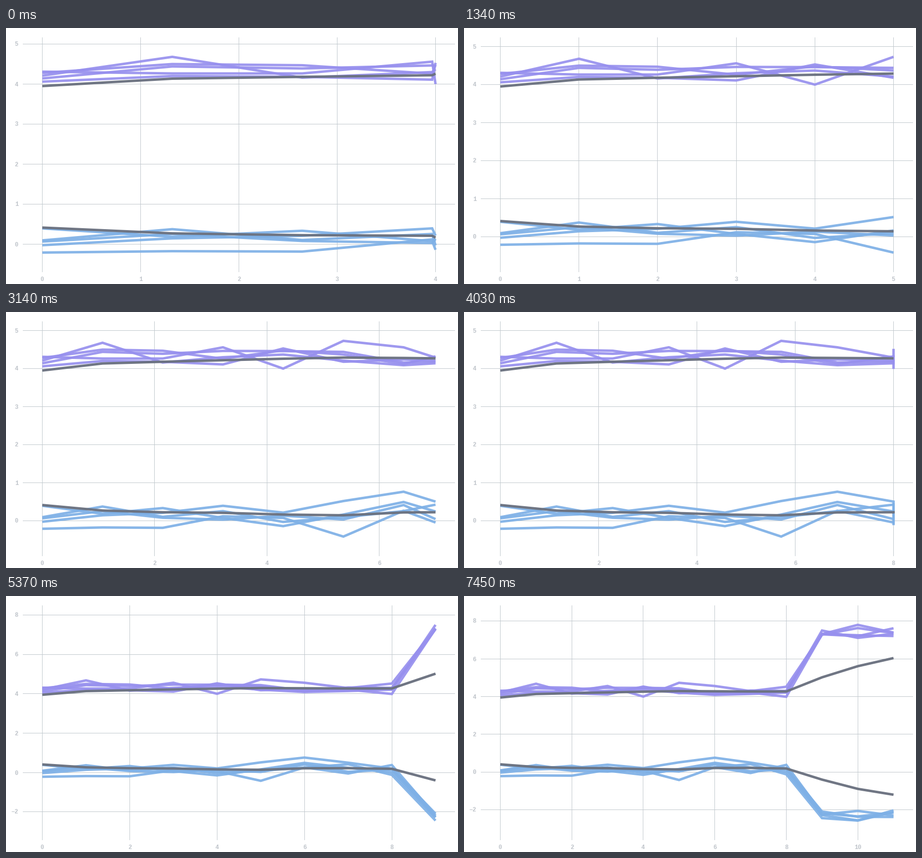
These frames come from a looping animation (915x518 px, 8 s). A matplotlib script:

```python
import numpy as np
import matplotlib.pyplot as plt
from matplotlib.animation import FuncAnimation
from matplotlib.collections import LineCollection

W, H, DPI = 915, 518, 100
PX = 72 / DPI
LEFT, RIGHT, TOP, BOTTOM = 73.5, 869.5, 58.4, 454.4
GRID_X, GRID_Y = (34, 909), (19, 494)

LOOP, STEP = 8000, 20
PERIOD, LEAD, FADE = 1020, 51, 250
# Moments (ms) at which the picture is refreshed.
REFRESH = [0, 150, 300, 1050, 1200, 1340, 2090, 2240, 2390, 3140, 3280, 4030,
           4180, 4330, 5080, 5230, 5370, 6120, 6270, 6410, 7160, 7300, 7450]

PURPLE, BLUE, GRAY = "#9790ee", "#7eb0e6", "#6b7280"
GRID, LABEL = "#c1c8cd", "#c0c5cb"

upper = [
    [4.21, 4.68, 4.16, 4.30, 4.37, 4.21, 4.09, 4.14, 4.21, 7.50, 7.11, 7.33],
    [4.28, 4.50, 4.47, 4.26, 4.48, 4.37, 4.12, 4.32, 4.30, 7.31, 7.80, 7.39],
    [4.14, 4.44, 4.39, 4.465, 4.46, 4.44, 4.16, 4.18, 4.28, 7.28, 7.63, 7.36],
    [4.31, 4.265, 4.265, 4.56, 4.00, 4.73, 4.56, 4.29, 4.52, 7.32, 7.25, 7.21],
    [4.06, 4.20, 4.18, 4.11, 4.53, 4.18, 4.24, 4.21, 3.99, 7.30, 7.20, 7.62],
]
lower = [
    [0.39, 0.18, 0.33, 0.07, -0.145, 0.16, 0.49, 0.24, 0.01, -2.28, -2.56, -2.03],
    [0.09, 0.37, 0.10, 0.25, -0.035, 0.09, 0.25, 0.42, -0.12, -2.44, -2.57, -2.12],
    [0.06, 0.25, 0.075, 0.025, 0.13, 0.03, 0.41, 0.04, 0.15, -2.25, -2.06, -2.30],
    [-0.03, 0.14, 0.205, 0.39, 0.21, 0.515, 0.76, 0.50, 0.20, -2.09, -2.37, -2.38],
    [-0.215, -0.18, -0.19, 0.115, 0.07, -0.42, 0.26, -0.05, 0.38, -2.18, -2.35, -2.14],
]
means = [
    [3.95, 4.135, 4.18, 4.22, 4.26, 4.29, 4.28, 4.27, 4.27, 5.02, 5.61, 6.04],
    [0.41, 0.265, 0.22, 0.205, 0.16, 0.14, 0.215, 0.22, 0.19, -0.40, -0.89, -1.20],
]
series = np.array(upper + lower + means)
colors = [PURPLE] * 5 + [BLUE] * 5 + [GRAY] * 2


def x_scale(v, last):
    return LEFT + (RIGHT - LEFT) * np.asarray(v) / last


def y_scale(v, last):
    seen = series[:, :last + 1]
    lo, hi = seen.min(), seen.max()
    return BOTTOM - (BOTTOM - TOP) * (np.asarray(v) - lo) / (hi - lo)


def ticks(scale, last, bounds):
    """Whole-number ticks, about five of them, inside the pixel bounds."""
    unit = abs(scale(1, last) - scale(0, last))
    span = (bounds[1] - bounds[0]) / unit
    step = 1 if span / 5 < np.sqrt(2) else 2
    spots = [(v, float(scale(v, last))) for v in range(-12, 17, step)]
    return [(v, p) for v, p in spots if bounds[0] <= p <= bounds[1]]


def ease(t):
    return 4 * t ** 3 if t < 0.5 else 1 - 4 * (1 - t) ** 3


fig = plt.figure(figsize=(W / 100, H / 100), dpi=DPI, facecolor="white")
ax = fig.add_axes([0, 0, 1, 1])
ax.set(xlim=(0, W), ylim=(H, 0))
ax.axis("off")

grid = LineCollection([], colors=GRID, linewidths=PX, zorder=1)
grid.set_snap(False)
ax.add_collection(grid, autolim=False)
lines = [ax.plot([], [], color=c, lw=5 * PX, alpha=0.97 if c == GRAY else 0.92,
                 solid_capstyle="butt", solid_joinstyle="miter", zorder=2)[0]
         for c in colors]
labels = [ax.text(0, 0, "", color=LABEL, family="Liberation Mono", weight="bold",
                  size=12 * PX, va="baseline") for _ in range(20)]


def draw_axes(last):
    xs, ys = ticks(x_scale, last, GRID_X), ticks(y_scale, last, GRID_Y)
    cols = [np.floor(p) + 0.5 for _, p in xs]
    rows = [np.floor(p) + 0.5 for _, p in ys]
    grid.set_segments([[(c, GRID_Y[0]), (c, GRID_Y[1])] for c in cols]
                      + [[(GRID_X[0], r), (GRID_X[1], r)] for r in rows])
    spots = [(c, 512, "center", v) for c, (v, _) in zip(cols, xs)]
    spots += [(25, r + 4, "right", v) for r, (v, _) in zip(rows, ys)]
    for i, label in enumerate(labels):
        label.set_visible(i < len(spots))
        if i < len(spots):
            x, y, align, v = spots[i]
            label.set(x=x, y=y, ha=align, text=str(v).replace("-", "\u2212"))


def draw_lines(last, p):
    # Known points slide from the old scale; the newest is already in place.
    idx = np.arange(last + 1)
    x = x_scale(idx, last)
    x[:-1] += (1 - p) * (x_scale(idx[:-1], last - 1) - x[:-1])
    for line, row in zip(lines, series):
        v = row[:last + 1]
        y = y_scale(v, last)
        y[:-1] += (1 - p) * (y_scale(v[:-1], last - 1) - y[:-1])
        line.set_data(x, y)


def update(i):
    t = i * STEP + STEP / 2
    shot = REFRESH[np.searchsorted(REFRESH, t, side="right") - 1]
    count, elapsed = divmod(shot + LEAD, PERIOD)
    last = 4 + count
    draw_axes(last)
    draw_lines(last, ease(min(elapsed / FADE, 1)))
    return [grid, *lines, *labels]


anim = FuncAnimation(fig, update, frames=LOOP // STEP, interval=STEP,
                     repeat=True, repeat_delay=0, blit=False)
plt.show()
```
